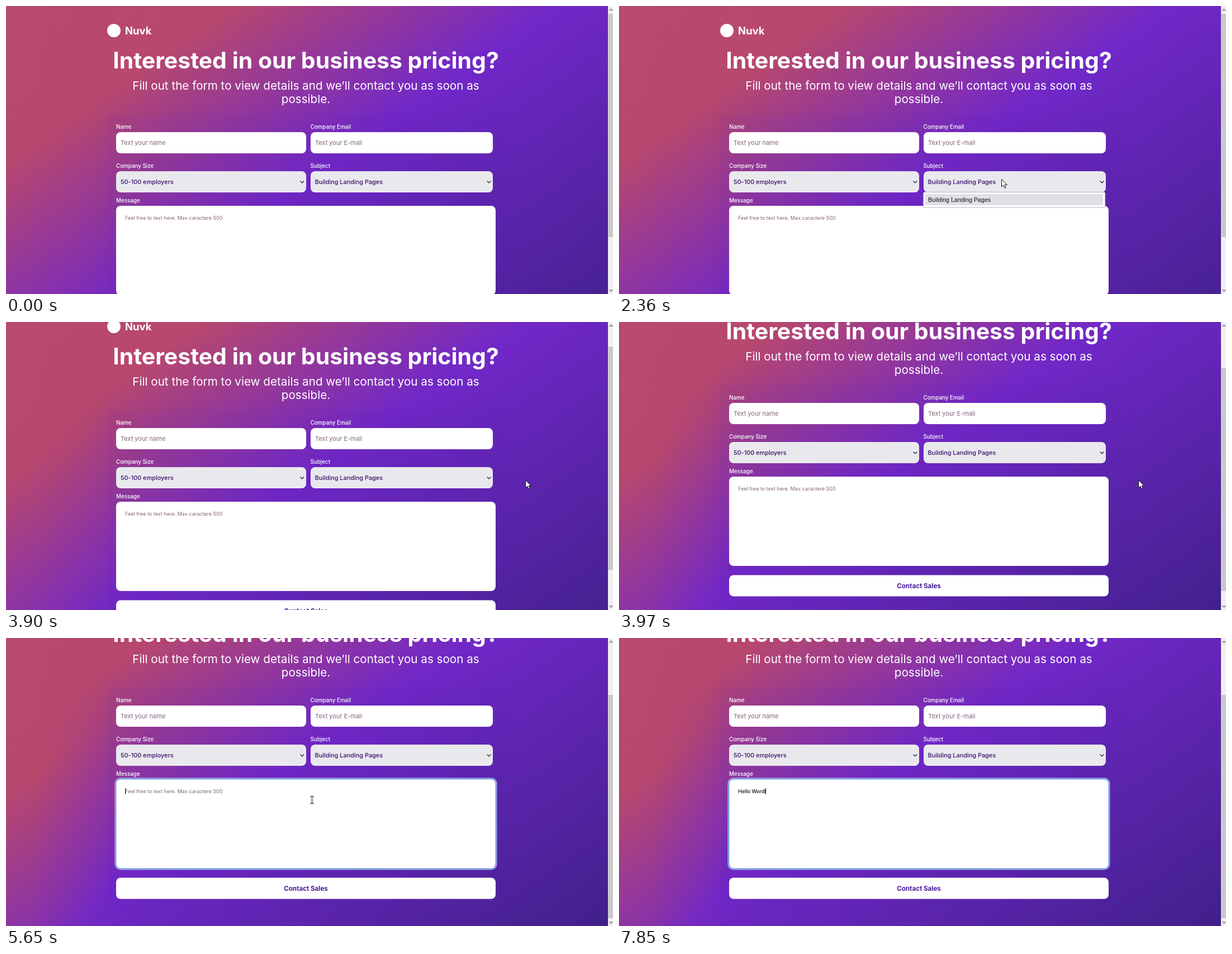
An HTML page that plays this animation: 1086x516 px, repeating every 8000 ms.

```html
<!DOCTYPE html>
<html lang="en">
<head>
<meta charset="utf-8">
<title>Business pricing form</title>
<style>
  html, body { margin: 0; width: 100%; height: 100%; overflow: hidden; background: #7128c8; }
  svg { display: block; width: 1086px; height: 516px; }
  text { font-family: Inter, "Open Sans", sans-serif; fill: #fff; white-space: pre; }
  .brand { font-size: 18.5px; font-weight: 700; }
  .title { font-size: 40.95px; font-weight: 700; text-anchor: middle; }
  .lead { font-size: 20.65px; text-anchor: middle; }
  .label { font-size: 9.8px; font-weight: 500; }
  .hint { font-size: 11px; fill: #80667f; }
  .value { font-size: 10.9px; font-weight: 500; fill: #35106a; }
  .small { font-size: 9.05px; }
  .note { fill: #80667f; }
  .typed { fill: #111; font-weight: 500; }
  .option { font: 10.67px "Liberation Sans", Arial, sans-serif; fill: #111; }
  .send { font-size: 11.6px; font-weight: 700; fill: #4a1a9a; text-anchor: middle; }
  .field { fill: #fff; }
  .select { fill: #e9e9ed; }
  .chevron { fill: none; stroke: #24104a; stroke-width: 1.2; }
  .bar { fill: none; stroke: #85787d; stroke-width: 1.5; }
</style>
</head>
<body>
<svg viewBox="0 0 1086 516">
  <defs>
    <linearGradient id="sky" gradientUnits="userSpaceOnUse" x1="215" y1="-151" x2="862" y2="772">
      <stop offset="0" stop-color="#b9496f"/>
      <stop offset=".2" stop-color="#b8486c"/>
      <stop offset=".5" stop-color="#7128c8"/>
      <stop offset="1" stop-color="#41208a"/>
    </linearGradient>
    <linearGradient id="fade">
      <stop offset=".3" stop-color="#fff"/>
      <stop offset="1" stop-color="#fff" stop-opacity="0"/>
    </linearGradient>
    <mask id="edge"><rect width="190" height="516" fill="url(#fade)"/></mask>
    <filter id="soft" x="-20%" y="-20%" width="140%" height="140%"><feGaussianBlur stdDeviation="18"/></filter>
  </defs>

  <rect class="scrolled" width="1077" height="621" fill="url(#sky)"/>
  <g mask="url(#edge)"><rect width="1077" height="621" fill="url(#sky)"/></g>

  <g class="scrolled">
    <rect x="181" y="194" width="710" height="396" fill="#4a2496" opacity=".04" filter="url(#soft)"/>
    <rect x="181" y="194" width="710" height="396" rx="5" fill="#5a2aa8" opacity=".04"/>

    <circle cx="193" cy="44" r="12" fill="#fff"/>
    <text class="brand" x="213" y="51">Nuvk</text>
    <text class="title" x="536.5" y="112">Interested in our business pricing?</text>
    <text class="lead" x="536.5" y="149.5">Fill out the form to view details and we’ll contact you as soon as</text>
    <text class="lead" x="536.5" y="173.5">possible.</text>

    <text class="label" x="197" y="219.7">Name</text>
    <rect class="field" x="197" y="226" width="340" height="38" rx="8"/>
    <text class="hint" x="205" y="249">Text your name</text>

    <text class="label" x="544.5" y="219.7">Company Email</text>
    <rect class="field" x="545" y="226" width="326" height="38" rx="8"/>
    <text class="hint" x="553" y="249">Text your E-mail</text>

    <text class="label" x="197" y="289.7">Company Size</text>
    <rect class="select" x="197" y="296" width="340" height="38" rx="8"/>
    <text class="value" x="205" y="319">50-100 employers</text>
    <path class="chevron" d="M526.5 313.5l3.3 3.3 3.3-3.3"/>

    <text class="label" x="544.5" y="289.7">Subject</text>
    <rect class="select" x="545" y="296" width="326" height="38" rx="8"/>
    <text class="value" x="552.5" y="319">Building Landing Pages</text>
    <path class="chevron" d="M860.8 313.5l3.3 3.3 3.3-3.3"/>

    <text class="label" x="197" y="351.5">Message</text>
    <g id="ring">
      <rect x="194.8" y="355.8" width="683.4" height="164.4" rx="10" fill="#fff"/>
      <rect x="195.8" y="356.8" width="681.4" height="162.4" rx="9" fill="#0a5ad2"/>
    </g>
    <rect class="field" x="197" y="358" width="679" height="160" rx="8"/>
    <text class="small note" id="note" x="213" y="383">Feel free to text here. Max caractere 500</text>
    <text class="small typed" id="typed" x="213" y="383"></text>
    <rect id="caret" y="374" width="1" height="11" fill="#111"/>

    <rect class="field" x="197" y="534.5" width="679" height="38" rx="8"/>
    <text class="send" x="536.5" y="557.5">Contact Sales</text>
  </g>

  <g id="menu">
    <rect x="544.7" y="333.5" width="325" height="27.5" rx="2" fill="#fff" stroke="#b4b0bb"/>
    <rect x="548" y="337" width="318" height="20" fill="#e0dfe5"/>
    <text class="option" x="553" y="351">Building Landing Pages</text>
  </g>

  <rect x="1077" width="9" height="516" fill="#f0eff1"/>
  <rect id="thumb" x="1077.5" y="14" width="8.5" height="400" fill="#c9c8ca"/>
  <path class="bar" d="M1079.5 8.5l3-3 3 3M1079.5 508l3 3 3-3"/>

  <path id="arrow" d="M.5 .5V14l3.2-2.9 2.3 5 2.2-1-2.2-4.7h4.3z" fill="#fff" stroke="#111"/>
  <path id="beam" d="M-3.5-6.5H-1Q0-6.5 0-5.5Q0-6.5 1-6.5H3.5M0-5.5V5.5M-3.5 6.5H-1Q0 6.5 0 5.5Q0 6.5 1 6.5H3.5" fill="none" stroke="#111" stroke-width="1.1"/>
</svg>
<script>
  const LOOP = 8000, STEP = 66.7;
  const MESSAGE = "Hello Wordl";
  const KEY_TIMES = [6110, 6250, 6350, 6450, 6670, 6800, 7130, 7340, 7460, 7720, 7850];

  // time, x, y, cursor shape
  const POINTER = [
    [0, 1200, 600, ""],
    [250, 1006, 479, "arrow"],
    [450, 855, 347, "arrow"],
    [620, 640, 232, "beam"],
    [690, 553, 212, "beam"],
    [780, 460, 214, "arrow"],
    [880, 388, 224, "beam"],
    [1050, 342, 236, "beam"],
    [1150, 342, 236, "beam"],
    [1280, 352, 246, "beam"],
    [1430, 430, 266, "arrow"],
    [1720, 625, 296, "arrow"],
    [1880, 684, 304, "arrow"],
    [1960, 684, 308, "arrow"],
    [2160, 684, 310, "arrow"],
    [2600, 684, 310, "arrow"],
    [2960, 690, 343, "arrow"],
    [3170, 690, 343, "arrow"],
    [3480, 800, 316, "arrow"],
    [3760, 929, 283, "arrow"],
    [4110, 929, 283, "arrow"],
    [4240, 872, 288, "beam"],
    [4500, 600, 291, "beam"],
    [4640, 547, 290, "beam"],
    [6110, 547, 290, ""]
  ];
  const SCROLL = [[0, 0], [3895, 36], [3965, 81], [4035, 105]];
  const MENU = [[0, 0], [2155, .4], [2230, .8], [2350, 1], [3240, 0]];
  const CARET = [[0, 0], [4610, 1], [5105, 0], [5645, 1]];

  const $ = id => document.getElementById(id);
  const [ring, note, typed, caret, menu, thumb, arrow, beam] =
    ["ring", "note", "typed", "caret", "menu", "thumb", "arrow", "beam"].map($);
  const scrolled = document.querySelectorAll(".scrolled");

  const rowAt = (table, t) => table.findLastIndex(row => row[0] <= t);
  const held = (table, t) => table[rowAt(table, t)][1];
  const show = (el, on) => el.setAttribute("opacity", +on);
  const move = (el, x, y) => el.setAttribute("transform", `translate(${x} ${y})`);

  function pointerAt(t) {
    const now = t < 250 ? t : 250 + Math.floor((t - 250) / STEP + .01) * STEP;
    const i = rowAt(POINTER, now);
    const [t0, x0, y0, shape] = POINTER[i];
    const [t1, x1, y1] = POINTER[i + 1] || [LOOP, x0, y0];
    const k = (now - t0) / (t1 - t0);
    return { x: Math.round(x0 + (x1 - x0) * k), y: Math.round(y0 + (y1 - y0) * k), shape };
  }

  function draw() {
    const t = performance.now() % LOOP;
    const scroll = held(SCROLL, t);
    scrolled.forEach(el => move(el, 0, -scroll));
    move(thumb, 0, scroll * .838);
    show(menu, held(MENU, t));
    show(ring, t >= 4610);

    const text = MESSAGE.slice(0, KEY_TIMES.filter(key => key <= t).length);
    if (typed.textContent !== text) typed.textContent = text;
    show(note, !text);
    show(caret, held(CARET, t));
    caret.setAttribute("x", 213 + (text ? Math.floor(typed.getComputedTextLength()) : 0));

    const { x, y, shape } = pointerAt(t);
    show(arrow, shape === "arrow");
    show(beam, shape === "beam");
    move(arrow, x, y);
    move(beam, x + .5, y);
    requestAnimationFrame(draw);
  }
  draw();
</script>
</body>
</html>
```
